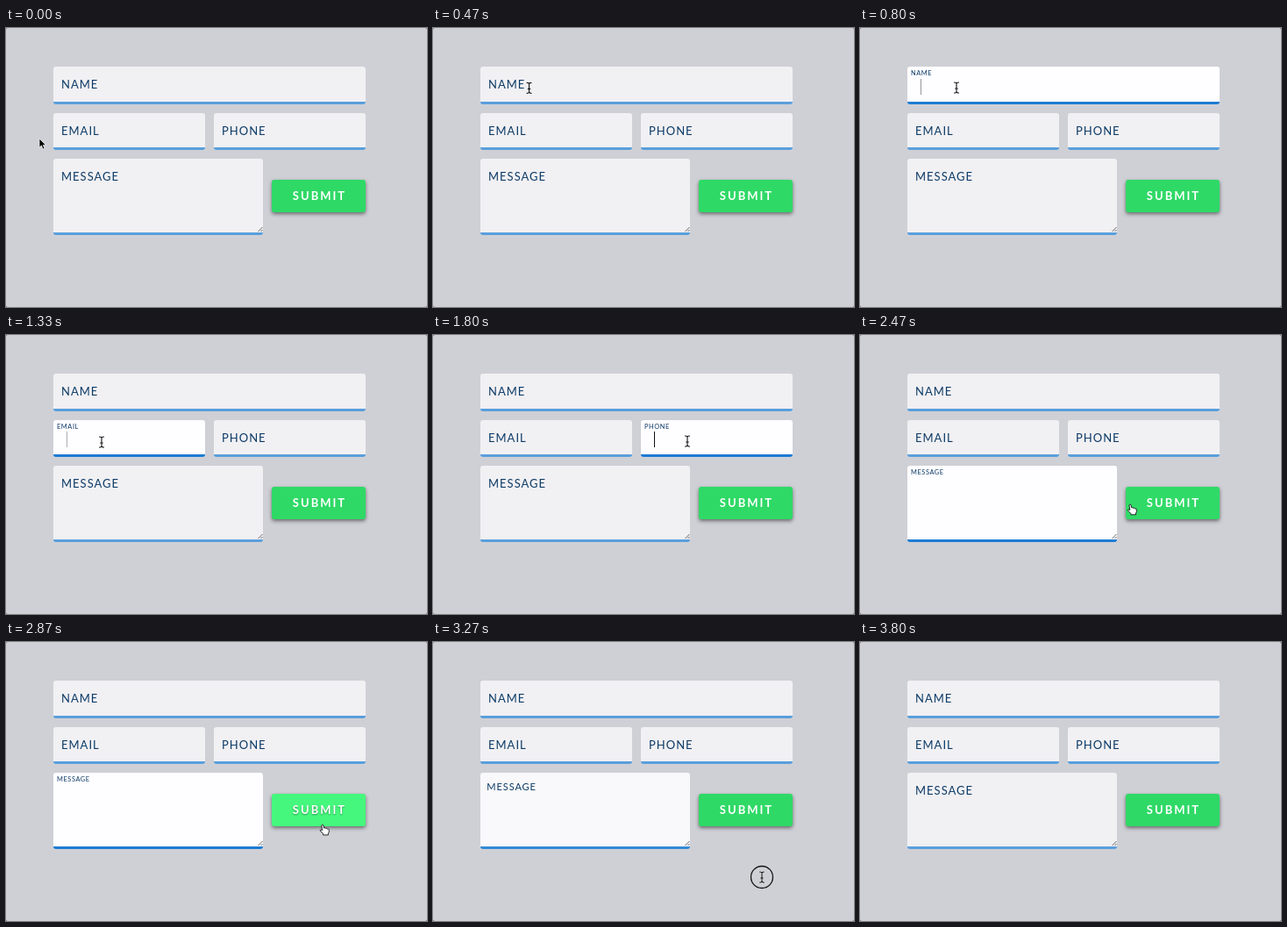
Animation of 480 by 318 pixels, one loop 3.87 s. Source, as an HTML page:

```html
<!DOCTYPE html>
<html lang="en">
<head>
<meta charset="utf-8">
<title>Contact form</title>
<style>
  html, body { margin: 0; width: 100%; height: 100%; overflow: hidden; background: #77777c; }
  #stage { position: relative; width: 480px; height: 318px; overflow: hidden;
    border-radius: 2px; background: #cfd0d6; font: 13px/16px Lato, sans-serif; }
  .field, #submit, svg { position: absolute; }
  .field { box-sizing: border-box; border-radius: 3px; border-bottom: 3px solid; }
  .field span { position: absolute; left: 9px; top: 12px; color: #0d3b66;
    letter-spacing: 1px; white-space: nowrap; transform-origin: 0 50%; }
  .field i { position: absolute; width: 1px; height: 18px; background: #111; }
  #submit { left: 303px; top: 173px; width: 107px; height: 37px; border-radius: 3px;
    box-shadow: 0 2px 4px rgba(0, 0, 0, .5); color: #fff; font-weight: 700;
    line-height: 36px; letter-spacing: 2px; text-indent: 2px; text-align: center; }
  svg { left: 0; top: 0; }
</style>
</head>
<body>
<div id="stage">
  <div id="submit">SUBMIT</div>
  <svg width="480" height="318" fill="none">
    <path d="M287.5 232l5-5M290.5 232l2-2" stroke="#555" stroke-width=".9"/>
    <g id="cursor">
      <circle id="ring" r="12.5" stroke="#111" stroke-width="1.3"/>
      <path id="arrow" d="M0 0V10.2L2.4 8L4.1 12L6 11.2L4.3 7.4H7.4Z"
        fill="#000" stroke="#fff" stroke-width=".7"/>
      <g id="beam" stroke-linecap="round">
        <path d="M-2.5 -6Q0 -6 0 -4.5Q0 -6 2.5 -6M0 -4.5V4.5M-2.5 6Q0 6 0 4.5Q0 6 2.5 6M-1.3 1H1.3"
          stroke="#fff" stroke-opacity=".6" stroke-width="2.2"/>
        <path d="M-2.5 -6Q0 -6 0 -4.5Q0 -6 2.5 -6M0 -4.5V4.5M-2.5 6Q0 6 0 4.5Q0 6 2.5 6M-1.3 1H1.3"
          stroke="#111" stroke-width="1.1"/>
      </g>
      <path id="hand" d="M-1 1Q0 -.8 1.1 1L1.8 4.2Q3 3.2 3.8 4.6Q5 3.8 5.8 5.2Q7.4 4.8 7.6 6.5Q7.8 9 6.6 10.2V12H.8V10.6L-2.8 7Q-2.8 5.4 -.2 6.6Z"
        fill="#fff" stroke="#111" stroke-width=".9" stroke-linejoin="round"/>
    </g>
  </svg>
</div>
<script>
const LOOP = 3870, FADE = 160;
const stage = document.getElementById('stage');
const byId = id => document.getElementById(id);
const [submit, cursor, ring, arrow, beam, hand] =
  ['submit', 'cursor', 'ring', 'arrow', 'beam', 'hand'].map(byId);

const clamp = u => Math.min(1, Math.max(0, u));
const smooth = u => u * u * (3 - 2 * u);
const mix = (a, b, u) => a + (b - a) * u;
const color = (from, to, u) => `rgb(${from.map((c, i) => Math.round(mix(c, to[i], u)))})`;

// CSS "ease": cubic-bezier(.25, .1, .25, 1)
function ease(u) {
  const bezier = (a, b, s) => 3 * a * s * (1 - s) ** 2 + 3 * b * s * s * (1 - s) + s ** 3;
  let low = 0, high = 1;
  for (let i = 0; i < 20; i++) {
    const mid = (low + high) / 2;
    if (bezier(.25, .25, mid) < u) low = mid; else high = mid;
  }
  return bezier(.1, 1, low);
}

// Transition towards 1 from `on`, back to 0 from `off`
const active = (t, on, off, curve) => t < off
  ? curve(clamp((t - on) / FADE))
  : 1 - curve(clamp((t - off) / FADE));

const clicks = [570, 1095, 1620, 2112, 3209];
const fields = [
  ['NAME', 54, 44, 356, 43, 15, 14],
  ['EMAIL', 54, 97, 173, 42, 15, 13],
  ['PHONE', 237, 97, 173, 42, 15, 13],
  ['MESSAGE', 54, 149, 239, 87, 13, 13]
].map(([text, x, y, w, h, caretX, caretY], i) => {
  const box = document.createElement('div');
  box.className = 'field';
  box.style.cssText = `left:${x}px;top:${y}px;width:${w}px;height:${h}px`;
  box.innerHTML = `<span>${text}</span><i style="left:${caretX - .5}px;top:${caretY}px"></i>`;
  stage.insertBefore(box, submit);
  const [label, caret] = box.children;
  return { box, label, caret, on: clicks[i], off: clicks[i + 1] };
});

// Cursor moves: start, end, target x, target y
const moves = [
  [70, 490, 110, 68], [840, 1050, 109, 122], [1360, 1580, 290, 121],
  [1860, 2070, 233, 194], [2300, 2600, 357, 192], [2750, 3160, 375, 268],
  [3350, 3760, 385, 318]
];

function cursorAt(t) {
  let x = 38, y = 126;
  for (const [start, end, toX, toY] of moves) {
    const u = smooth(clamp((t - start) / (end - start)));
    x = mix(x, toX, u);
    y = mix(y, toY, u);
  }
  return [x, y];
}

function caretAlpha(t, on, off) {
  if (t < on || t >= off) return 0;
  const phase = (t - on) % 500;
  return phase < 300 ? 1 - clamp((phase - 200) / 55) : clamp((phase - 450) / 50);
}

const show = (element, visible) => element.setAttribute('visibility', visible ? 'visible' : 'hidden');

function draw(t) {
  for (const { box, label, caret, on, off } of fields) {
    const float = active(t, on, off, ease), tint = active(t, on, off, u => u);
    label.style.transform = `translate(${-5 * float}px, ${-13 * float}px) scale(${1 - .43 * float})`;
    box.style.backgroundColor = color([241, 240, 243], [254, 253, 255], tint);
    box.style.borderColor = color([90, 159, 220], [28, 124, 210], tint);
    caret.style.opacity = caretAlpha(t, on, off);
  }
  const hover = active(t, 2463, 2885, ease);
  submit.style.backgroundColor = color([47, 217, 102], [69, 248, 125], hover);
  submit.style.textShadow = `0 1px 2px rgba(0, 0, 0, ${.4 * hover})`;

  const [x, y] = cursorAt(t);
  const onButton = x > 303 && x < 410 && y > 173 && y < 210;
  const visible = t < 3780;
  cursor.setAttribute('transform', `translate(${x} ${y})`);
  show(arrow, visible && x < 54);
  show(hand, visible && onButton);
  show(beam, visible && x >= 54 && !onButton);
  show(ring, clicks.some(c => t > c - 30 && t < c + 75));
}

const began = performance.now();
function tick() {
  draw((performance.now() - began) % LOOP);
  requestAnimationFrame(tick);
}
tick();
</script>
</body>
</html>
```
